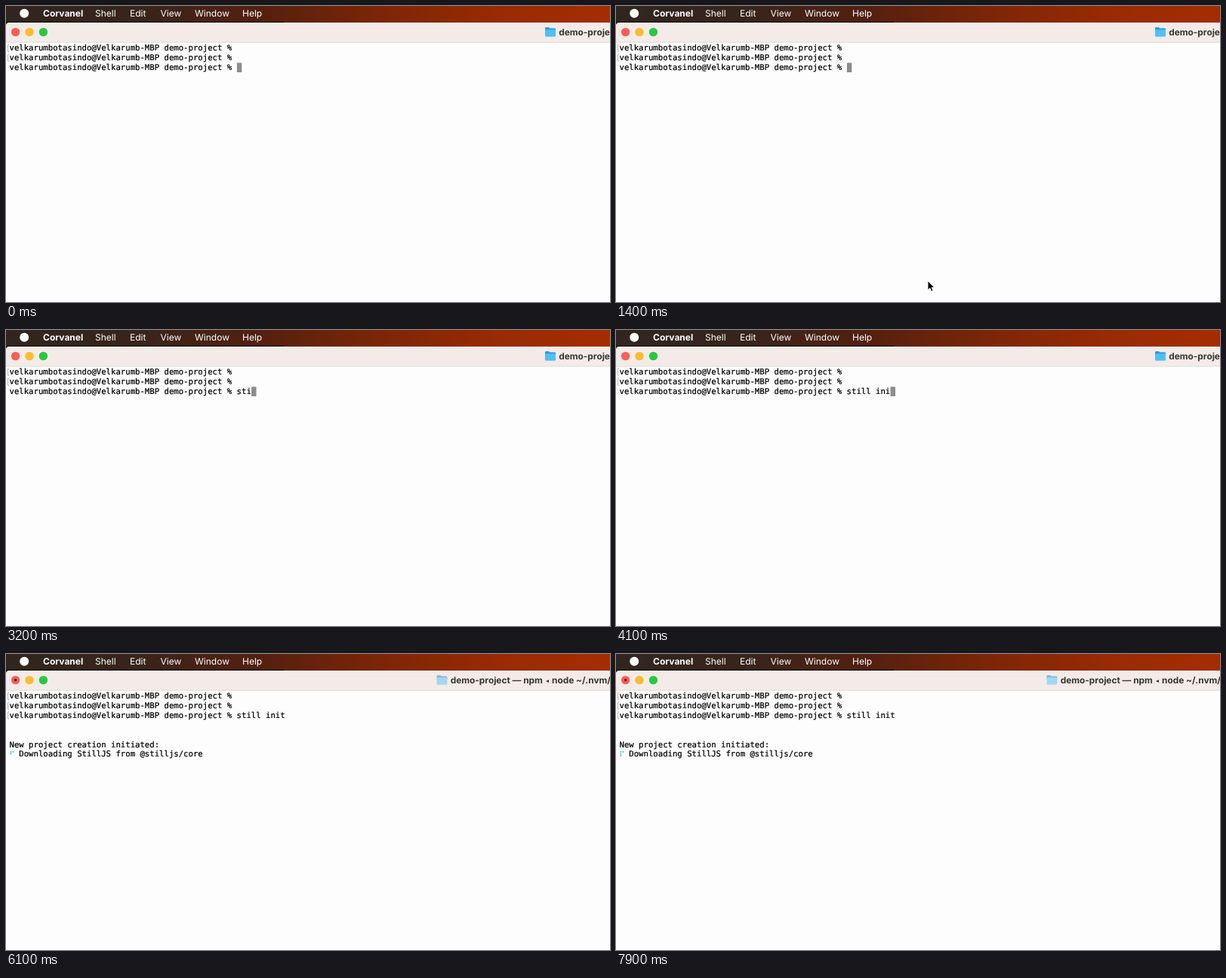
An HTML page that plays this animation: 800x393 px, repeating every 8000 ms.

```html
<!DOCTYPE html>
<html lang="en">
<head>
<meta charset="utf-8">
<title>Project setup</title>
<style>
html, body { margin: 0; width: 100%; height: 100%; overflow: hidden; background: #fdfdfd; }
svg { display: block; width: 100%; height: 100%; }
text { white-space: pre; text-rendering: geometricPrecision; }
.ui { font: 400 12px Inter, "Open Sans", sans-serif; fill: #fff; }
.bold { font-weight: 700; }
.title { font-size: 11.87px; fill: #393532; }
.small { font-size: 7px; }
.mono { font: 10.65px "DejaVu Sans Mono", monospace; fill: #000; stroke: #000; stroke-width: .22px; }
</style>
</head>
<body>
<svg viewBox="0 0 800 393">
  <defs>
    <linearGradient id="wall">
      <stop offset="0" stop-color="#30261f"/>
      <stop offset=".22" stop-color="#38241b"/>
      <stop offset=".42" stop-color="#54200f"/>
      <stop offset=".62" stop-color="#7c2607"/>
      <stop offset=".82" stop-color="#992b02"/>
      <stop offset="1" stop-color="#a42d00"/>
    </linearGradient>
  </defs>
  <rect width="800" height="40" fill="url(#wall)"/>
  <rect y="20.8" width="368" height="1.4" fill="#1d100b"/>
  <circle cx="24.2" cy="9.8" r="6" fill="#fff"/>
  <g id="menu"></g>

  <path d="M0 393V27Q0 22 5 22H800V393Z" fill="#fdfdfd"/>
  <path d="M0 48V27Q0 22 5 22H800V48Z" fill="#f4ebe8"/>
  <path d="M0 48.2H800" stroke="#d9d2cf" stroke-width=".8"/>
  <circle cx="12.6" cy="34.6" r="5.7" fill="#fe5f57"/>
  <circle cx="31" cy="34.6" r="5.7" fill="#febc2e"/>
  <circle cx="49.4" cy="34.6" r="5.7" fill="#28c840"/>
  <circle id="busyDot" cx="12.6" cy="34.6" r="1.8" fill="#7d120c"/>

  <g id="heading">
    <path id="folderBack" d="M0 29.6q0-1.4 1.4-1.4h3.4l1.5 1.4h6.3q1.4 0 1.4 1.4v3H0z"/>
    <rect id="folderFront" y="31.2" width="14" height="9.6" rx="1.3"/>
    <text class="ui bold title" x="18.2" y="38.6"><tspan id="task"></tspan><tspan id="arrow" class="small" dx="1.5" dy="-1">◂</tspan><tspan id="child" dx="1.5" dy="1"> node ~/.nvm/versions</tspan></text>
  </g>

  <g id="brackets" fill="none" stroke="#a5a5a5" stroke-width=".8"></g>
  <rect id="caret" width="6.4" height="12.6" fill="#8c8c8c"/>
  <g id="lines"></g>
  <g id="spinner" fill="#2fb4d8"></g>
  <path id="pointer" d="M0 0V12.2L2.8 9.6L4.8 14L6.9 13L5 8.8H8.8Z" fill="#000" stroke="#fff" stroke-width=".9"/>
</svg>
<script>
const NS = "http://www.w3.org/2000/svg";
const $ = id => document.getElementById(id);
const LOOP = 8000, LEFT = 4.5, CELL = 6.412, ROW = 12.83;
const PROMPT = "velkarumbotasindo@Velkarumb-MBP demo-project % ";
const COMMAND = "still init";
const KEYS = [2900, 3050, 3200, 3350, 3480, 3620, 3760, 3920, 4070, 4600];
const ENTER = 5000, SPIN_START = 5140, OUTPUT = 5600, NPM = 5850;
// Braille dot numbers lit at each step
const SPIN = ["124", "145", "1456", "456", "3456", "356", "236", "1236", "123", "1234"];
const SPIN_STEP = 95;

function add(parent, tag, attrs, text = "") {
  const el = document.createElementNS(NS, tag);
  for (const k in attrs) el.setAttribute(k, attrs[k]);
  el.textContent = text;
  return $(parent).appendChild(el);
}
const show = (el, on) => el.setAttribute("visibility", on ? "visible" : "hidden");
const write = (el, s) => { if (el.textContent !== s) el.textContent = s; };
const line = (row, text, col = 0) =>
  add("lines", "text", { class: "mono", x: LEFT + col * CELL, y: 59.4 + row * ROW }, text);

[["Corvanel", 49], ["Shell", 118], ["Edit", 164], ["View", 204.5], ["Window", 250], ["Help", 313]]
  .forEach(([name, x], i) => add("menu", "text", { class: i ? "ui" : "ui bold", x, y: 14 }, name));

const brackets = [0, 1, 2].map(r =>
  add("brackets", "path", { d: `M4 ${51.2 + r * ROW}H2.5v9.2H4` }));
line(0, PROMPT);
line(1, PROMPT);
const input = line(2, PROMPT);
const output = [line(5, "New project creation initiated:"),
                line(6, "Downloading StillJS from @stilljs/core", 2)];
const dots = [1, 2, 3, 4, 5, 6].map((n, i) =>
  add("spinner", "circle", { cx: i < 3 ? 6.4 : 9.4, cy: 129.9 + i % 3 * 2.6, r: .9 }));

function heading(t) {
  const busy = t >= ENTER, npm = t >= NPM;
  const [x, task] = !busy ? [714, "-zsh"]
    : npm ? [570.5, "npm "]
    : [589, "node ~/.nvm/versions/node"];
  $("heading").setAttribute("transform", `translate(${x} 0)`);
  write($("task"), "demo-project — " + task);
  show($("arrow"), npm);
  show($("child"), npm);
  $("folderBack").setAttribute("fill", busy ? "#7dbbdc" : "#239be0");
  $("folderFront").setAttribute("fill", busy ? "#a5d8ef" : "#53bdf8");
  show($("busyDot"), busy);
}

function draw(t) {
  const typed = KEYS.filter(k => t >= k).length;
  const entered = t >= ENTER, printed = t >= OUTPUT;
  heading(t);
  write(input, PROMPT + COMMAND.slice(0, typed));
  show(brackets[2], entered);

  const col = entered ? 0 : PROMPT.length + typed;
  $("caret").setAttribute("x", LEFT + col * CELL);
  $("caret").setAttribute("y", entered ? 88.2 : 75.4);
  show($("caret"), !printed);

  output.forEach(el => show(el, printed));
  const step = Math.max(0, Math.floor((t - SPIN_START) / SPIN_STEP));
  const lit = SPIN[step % SPIN.length];
  dots.forEach((el, i) => show(el, printed && lit.includes(i + 1)));

  // Pointer slides in from the bottom edge, then hides when typing starts
  const p = Math.min(1, Math.max(0, (t - 700) / 450));
  const rest = (1 - p) ** 2;
  $("pointer").setAttribute("transform", `translate(${413 - 9 * rest} ${365 + 31 * rest})`);
  show($("pointer"), t >= 700 && t < 2700);
}

const start = performance.now();
function tick() {
  draw((performance.now() - start) % LOOP);
  requestAnimationFrame(tick);
}
draw(0);
requestAnimationFrame(tick);
</script>
</body>
</html>
```
